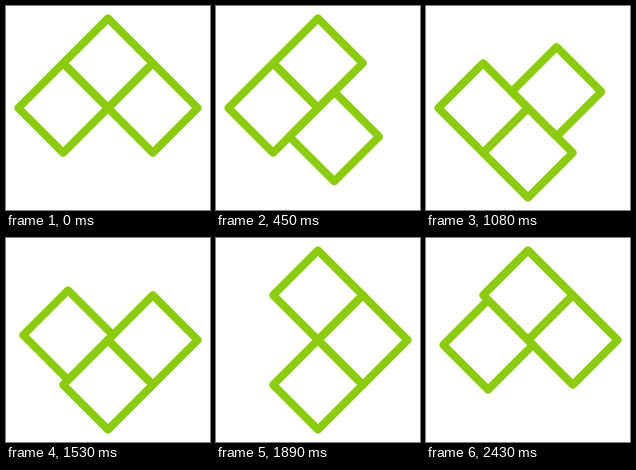
Animation, 256 px wide and 256 px high, one loop 2.52 s. Source, as an HTML page:

```html
<!DOCTYPE html>
<html lang="en">
<head>
<meta charset="utf-8">
<title>Sliding diamonds</title>
<style>
  html, body { margin: 0; width: 100%; height: 100%; overflow: hidden; background: #fff; }
  svg { display: block; width: 100vw; height: 100vh; }
  .tile { fill: none; stroke: #8ccb10; stroke-width: 10; stroke-linejoin: round; }

  /* Each slide is the previous one turned a quarter counter-clockwise. */
  .board { transform-origin: 0 0; animation: turn 2520ms steps(4) infinite; }
  .slider { transform-origin: 0 0; animation: slide 630ms step-end infinite; }

  @keyframes turn { from { transform: rotate(0deg); } to { transform: rotate(-360deg); } }
  @keyframes slide {
    0%      { transform: translate(0, 0); }
    42.857% { transform: translate(-6.15px, 6.15px); }
    57.142% { transform: translate(-20.4px, 20.4px); }
    71.428% { transform: translate(-35.85px, 35.85px); }
    85.714% { transform: translate(-50.1px, 50.1px); }
    100%    { transform: translate(-56.25px, 56.25px); }
  }
</style>
</head>
<body>
<svg viewBox="0 0 256 256">
  <defs>
    <path id="diamond" d="M0-56.25 56.25 0 0 56.25-56.25 0Z"/>
  </defs>
  <g transform="translate(128 128)">
    <g class="board tile">
      <use href="#diamond" y="-56.25"/>
      <use href="#diamond" x="-56.25"/>
      <g class="slider"><use href="#diamond" x="56.25"/></g>
    </g>
  </g>
</svg>
</body>
</html>
```
